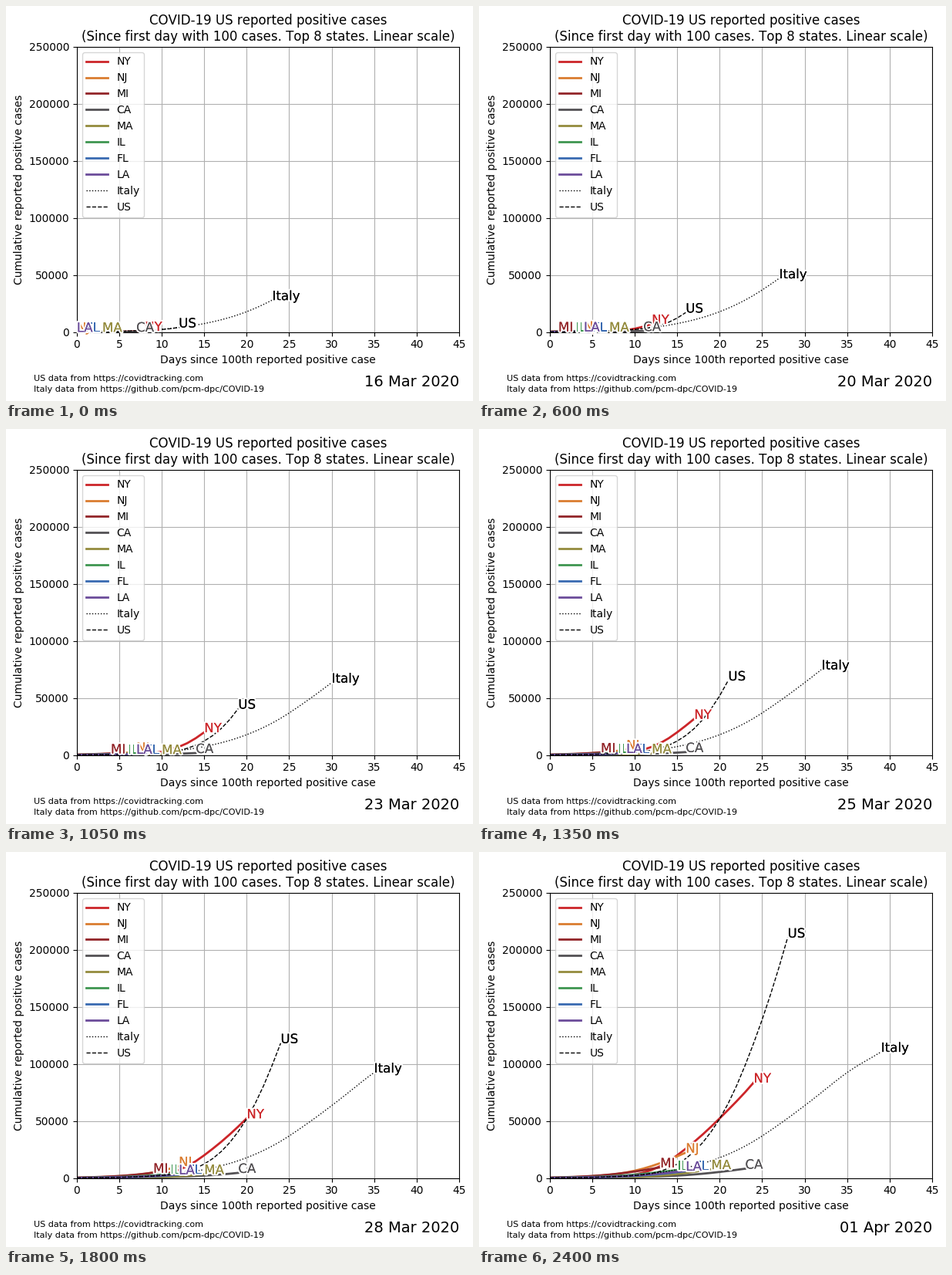
Write a matplotlib script that moves like this. It is 606 px wide and 512 px high and loops after 4.95 s.

```python
import numpy as np
import matplotlib.pyplot as plt
from matplotlib.animation import FuncAnimation
from matplotlib.patheffects import Normal, withStroke

W, H, DPI = 606, 512, 100
DAYS, FRAMES, STEP_MS = 17, 33, 150  # the last day is held until the loop ends

plt.rcParams["font.family"] = "DejaVu Sans"
plt.rcParams["text.kerning_factor"] = 6


def curve(days, step, *keys):
    """Daily counts for days 0..days; the keys lie step days apart and end
    on the last day. Cubic Hermite interpolation of the square roots."""
    root = np.sqrt(keys)
    slope = np.gradient(root)
    x = len(keys) - 1 + (np.arange(days + 1) - days) / step
    i = np.clip(np.floor(x).astype(int), 0, len(keys) - 2)
    u = x - i
    ease = u * u * (3 - 2 * u)
    bend = u * (1 - u) * ((1 - u) * slope[i] - u * slope[i + 1])
    return (root[i] + ease * (root[i + 1] - root[i]) + bend) ** 2


STATE = dict(ls="-", lw=2)
DOTTED = dict(ls=":", lw=1, color="black")
DASHED = dict(ls="--", lw=1, color="black")

SERIES = [
    ("NY", dict(STATE, color="#cc2529"),
     curve(24, 4, 105, 216, 950, 7102, 25665, 52318, 83712)),
    ("NJ", dict(STATE, color="#da7c30"), curve(16, 8, 176, 3675, 22255)),
    ("MI", dict(STATE, color="#922428"), curve(13, 8, 54, 1791, 9334)),
    ("CA", dict(STATE, color="#535154"), curve(23, 8, 90, 335, 2102, 8155)),
    ("MA", dict(STATE, color="#948b3d"), curve(19, 8, 30, 164, 1159, 7738)),
    ("IL", dict(STATE, color="#3e9651"), curve(15, 8, 93, 1535, 6980)),
    ("FL", dict(STATE, color="#396ab1"), curve(17, 8, 20, 141, 1412, 6955)),
    ("LA", dict(STATE, color="#6b4c9a"), curve(16, 8, 114, 1388, 6424)),
    ("Italy", DOTTED,
     curve(39, 4, 60, 322, 1128, 3089, 7375, 15113, 27980, 47021, 69176,
           92472, 110574)),
    ("US", DASHED,
     curve(28, 4, 118, 417, 1315, 4019, 17038, 51954, 118234, 210816)),
]

fig = plt.figure(figsize=(W / DPI, H / DPI), dpi=DPI, facecolor="white")
ax = fig.add_axes([91.9 / W, 89.45 / H, 496 / W, 369.6 / H])
ax.set_xlim(0, 45)
ax.set_ylim(0, 250000)
ax.set_xticks(range(0, 46, 5))
ax.set_yticks(range(0, 250001, 50000))
ax.grid(True)
ax.set_title("COVID-19 US reported positive cases\n"
             "(Since first day with 100 cases. Top 8 states. Linear scale)")
ax.set_xlabel("Days since 100th reported positive case")
ax.set_ylabel("Cumulative reported positive cases")


def note(x, y, text, size, ha="left"):
    """Figure text at a pixel position measured from the top left."""
    return fig.text(x / W, 1 - y / H, text, fontsize=size, ha=ha,
                    va="baseline")


note(36, 486, "US data from https://covidtracking.com", 8)
note(36, 500, "Italy data from https://github.com/pcm-dpc/COVID-19", 8)
date = note(588, 493, "", 14, ha="right")

# the second pass over the glyphs makes their edges heavier
halo = [withStroke(linewidth=3, foreground="white"), Normal()]
lines, tags = [], []
for name, style, cases in SERIES:
    lines += ax.plot([], [], label=name, **style)
    tags.append(ax.text(0, 0, name, color=style["color"], fontsize=12,
                        path_effects=halo))
ax.legend(loc="upper left")


def update(frame):
    left = max(DAYS - 1 - frame, 0)
    day = 16 + DAYS - 1 - left
    date.set_text(f"{day} Mar 2020" if day <= 31 else f"{day - 31:02d} Apr 2020")
    for (_, _, cases), line, tag in zip(SERIES, lines, tags):
        n = max(len(cases) - left, 0)
        line.set_data(np.arange(n), cases[:n])
        tag.set_visible(n > 0)
        if n:
            tag.set_position((n - 1, cases[n - 1]))
    return [date, *lines, *tags]


anim = FuncAnimation(fig, update, frames=FRAMES, interval=STEP_MS,
                     init_func=lambda: update(0), repeat=True)
plt.show()
```
